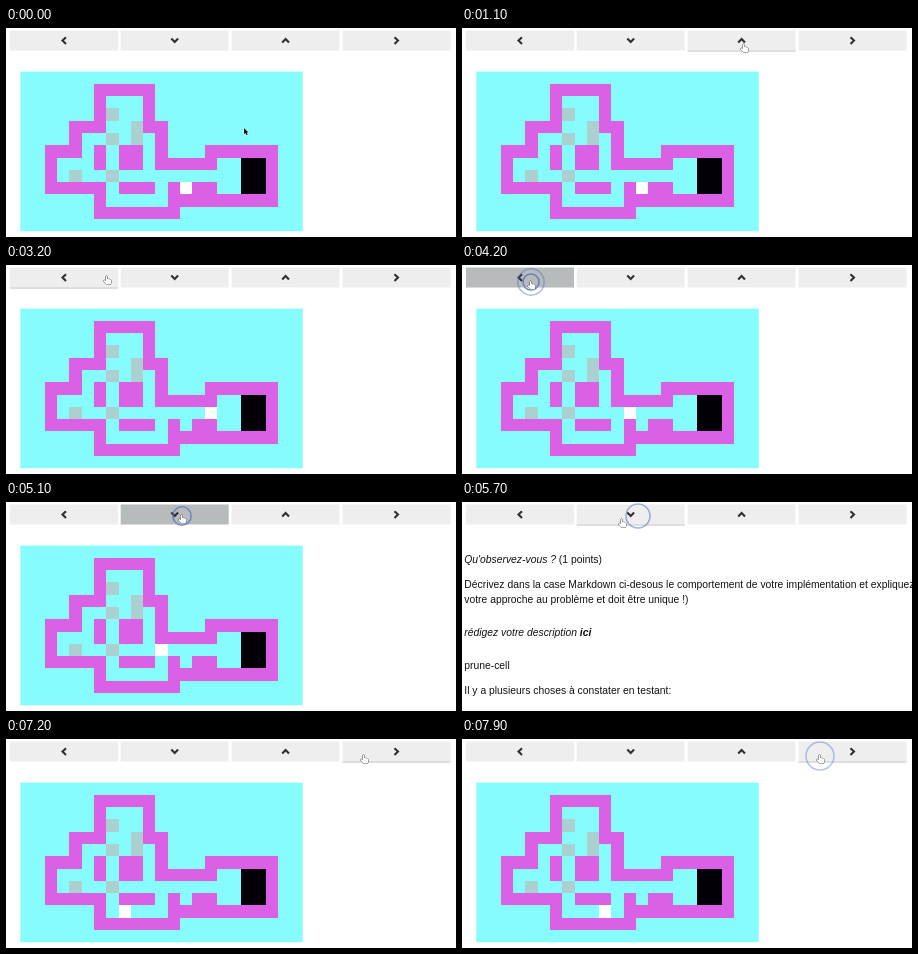
An HTML page with a canvas for the animation above (8000 ms loop, 450 by 209 pixels).

```html
<!DOCTYPE html>
<html lang="fr">
<head>
<meta charset="utf-8">
<title>Maze</title>
<style>
html, body { margin: 0; width: 100%; height: 100%; overflow: hidden; background: #fff; }
canvas { display: block; }
</style>
</head>
<body>
<canvas id="stage" width="450" height="209"></canvas>
<script>
const ctx = document.getElementById('stage').getContext('2d');
const LOOP = 8000, STEP = 100, HOLD = 130, FLASH = 100, RING = 400;
const CELL = 12.28, LEFT = 14.3, TOP = 43.6;
const FONT = '10.35px "Liberation Sans", Arial, sans-serif';

const maze = [
  '',
  '......#####',
  '......#...#',
  '......#g..#',
  '....###..g##',
  '....#..g.g.#',
  '..###.#.##.#...######',
  '..#...#.##.#####..kk#',
  '..#.g..g..........kk#',
  '..#####.###.#.##..kk#',
  '......#.....#########',
  '......#######'
];
const colors = { '#': '#da60e6', g: '#abd0d0', k: '#020006' };

// x position, move and glyph rotation of each button
const buttons = [
  { x: 4, move: [-1, 0], turn: 0 },
  { x: 114.7, move: [0, 1], turn: -Math.PI / 2 },
  { x: 225.6, move: [0, -1], turn: Math.PI / 2 },
  { x: 336.5, move: [1, 0], turn: Math.PI }
];

// time, button, page jumps while the board is redrawn
const clicks = [
  [1300, 2], [2300, 3], [2650, 3, true],
  [3420, 0], [3680, 0], [3940, 0], [4200, 0],
  [5040, 1], [5500, 1, true],
  [6000, 0], [6250, 0], [6480, 0, true],
  [7300, 3], [7600, 3, true]
];

// time, x, y
const track = [
  [0, 238, 100], [500, 238, 100], [1000, 282, 17], [1800, 282, 17],
  [2150, 363, 17], [2800, 363, 17], [3200, 101, 12], [3350, 69, 17],
  [4400, 69, 17], [4800, 176, 14], [5560, 176, 14], [5700, 160, 18],
  [5950, 69, 17], [6700, 69, 17], [7150, 358, 17], [8000, 358, 17]
];

function pointerAt(t) {
  const i = track.findIndex(p => p[0] > t);
  const [t0, x0, y0] = track[i - 1], [t1, x1, y1] = track[i];
  const u = (t - t0) / (t1 - t0), e = u * u * (3 - 2 * u);
  return [x0 + (x1 - x0) * e, y0 + (y1 - y0) * e];
}

function box(color, x, y, w, h) {
  ctx.fillStyle = color;
  ctx.fillRect(x, y, w, h);
}

function drawButtons(t, [px, py]) {
  buttons.forEach((b, i) => {
    const hover = py < 23 && px >= b.x && px < b.x + 108;
    const down = clicks.some(c => c[1] === i && t >= c[0] && t < c[0] + HOLD);
    if (hover && !down) box('#bdbdbd', b.x, 22.3, 108, 1.2);
    box(down ? '#b8bbbb' : '#eeeeee', b.x, 2.5, 108, 20);
    ctx.save();
    ctx.translate(b.x + 54, 12.6);
    ctx.rotate(b.turn);
    ctx.strokeStyle = '#303030';
    ctx.lineWidth = 2.1;
    ctx.beginPath();
    ctx.moveTo(2, -3.4);
    ctx.lineTo(-1.5, 0);
    ctx.lineTo(2, 3.4);
    ctx.stroke();
    ctx.restore();
  });
}

function drawBoard(t) {
  const cell = (color, c, r) => {
    const x = Math.round(LEFT + c * CELL), y = Math.round(TOP + r * CELL);
    box(color, x, y, Math.round(LEFT + (c + 1) * CELL) - x, Math.round(TOP + (r + 1) * CELL) - y);
  };
  box('#86fcfc', LEFT, TOP, CELL * 23, CELL * 13);
  maze.forEach((row, r) => [...row].forEach((k, c) => {
    if (colors[k]) cell(colors[k], c, r);
  }));
  let x = 13, y = 9;
  for (const [start, i] of clicks) {
    if (t < start + HOLD) break;
    x += buttons[i].move[0];
    y += buttons[i].move[1];
  }
  cell('#fff', x, y);
}

function write(y, ...runs) {
  let x = 2.3;
  ctx.fillStyle = '#111';
  for (const [text, style = ''] of runs) {
    ctx.font = style + ' ' + FONT;
    ctx.fillText(text, x, y);
    x += ctx.measureText(text).width;
  }
}

function drawNotes() {
  write(61, ["Qu'observez-vous ?", 'italic'], [' (1 points)']);
  write(85.5, ['Décrivez dans la case Markdown ci-desous le comportement de votre implémentation et expliquez']);
  write(100.5, ['votre approche au problème et doit être unique !)']);
  write(133.5, ['rédigez votre description ', 'italic'], ['ici', 'italic bold']);
  write(167, ['prune-cell']);
  write(191.5, ['Il y a plusieurs choses à constater en testant:']);
}

function drawRings(t) {
  for (const [start] of clicks) {
    const age = t - start;
    if (age < 0 || age >= RING) continue;
    const [x, y] = pointerAt(start);
    ctx.beginPath();
    ctx.arc(x, y, 8 + Math.min(6, age / 50), 0, 7);
    ctx.strokeStyle = `rgba(85,115,195,${0.85 - age / 700})`;
    ctx.lineWidth = 1.5;
    ctx.stroke();
  }
}

function drawPointer([x, y]) {
  const hand = y < 24;
  const shape = hand
    ? 'M-1.2 4V-.6Q-.4-1.6.4-.6V2L3.6 2.6Q4.6 3 4.4 4.2L3.6 7.5H-.6L-3.4 4.2Q-3.4 3-2.4 3.2Z'
    : 'M0 0V6.2L1.5 4.9 2.6 7.3 3.7 6.8 2.7 4.4H4.5Z';
  ctx.save();
  ctx.translate(x, y);
  const path = new Path2D(shape);
  ctx.fillStyle = hand ? '#fff' : '#111';
  ctx.strokeStyle = hand ? '#444' : 'rgba(255,255,255,.7)';
  ctx.lineWidth = 0.9;
  ctx.stroke(path);
  ctx.fill(path);
  ctx.restore();
}

function draw(now) {
  const t = Math.floor(now % LOOP / STEP) * STEP;
  const pointer = pointerAt(t);
  const cleared = clicks.some(c => c[2] && t >= c[0] + HOLD && t < c[0] + HOLD + FLASH);
  box('#fff', 0, 0, 450, 209);
  drawButtons(t, pointer);
  if (cleared) drawNotes(); else drawBoard(t);
  drawRings(t);
  drawPointer(pointer);
}

const begin = performance.now();
function loop() {
  draw(performance.now() - begin);
  requestAnimationFrame(loop);
}
loop();
</script>
</body>
</html>
```
